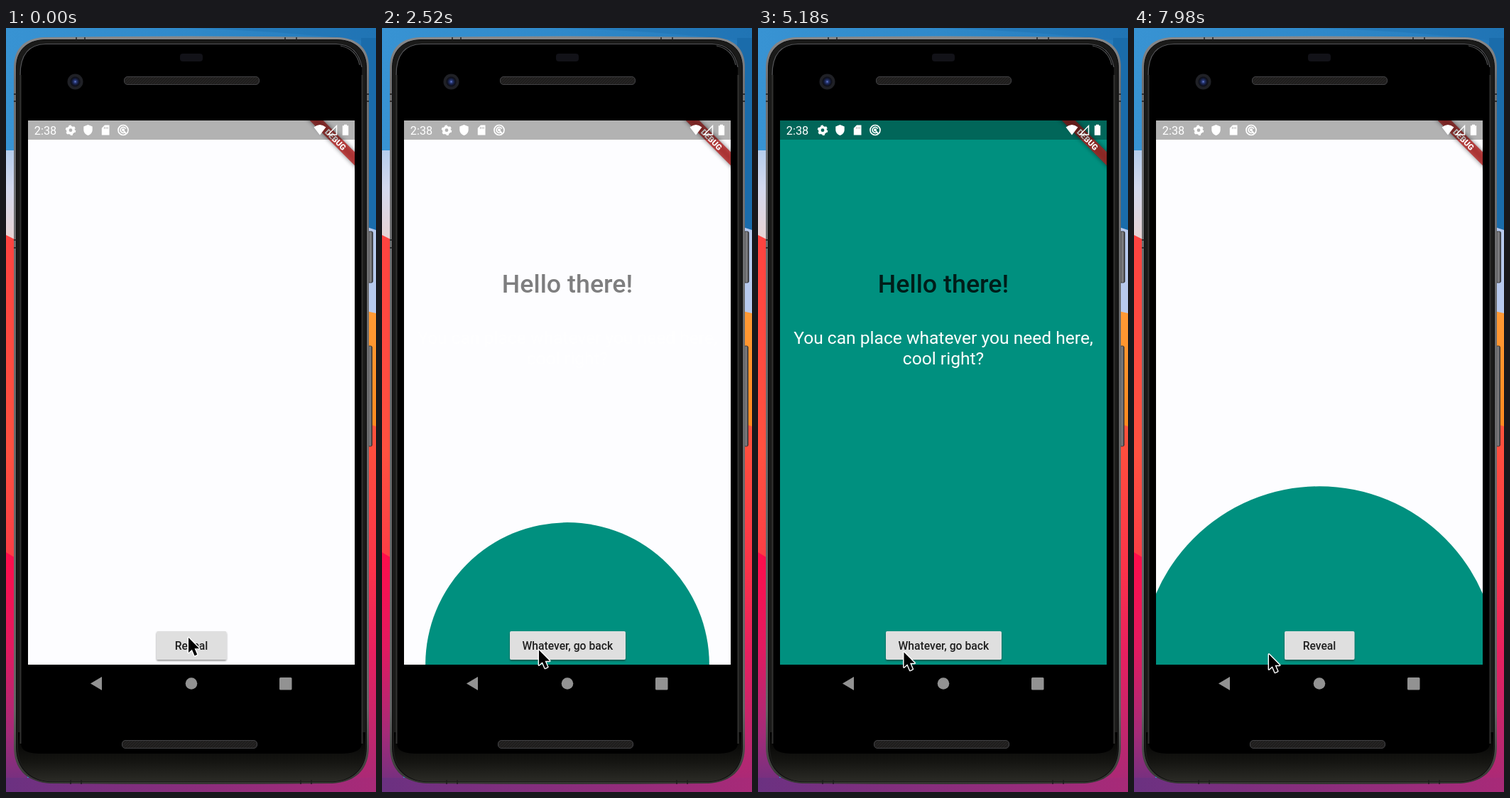
These frames come from a looping animation (521 px wide and 1074 px high, 8000 ms). An HTML page:

```html
<!DOCTYPE html>
<html lang="en">
<head>
<meta charset="utf-8">
<title>Circular reveal</title>
<style>
html, body { margin: 0; width: 100%; height: 100%; overflow: hidden; background: #000; }
svg { display: block; width: 100%; height: 100%; }
text { font-family: Roboto, "Liberation Sans", sans-serif; text-anchor: middle; }
.label { font-size: 15.7px; font-weight: 500; fill: #1f1f1f; }
</style>
</head>
<body>
<svg viewBox="0 0 521 1074" preserveAspectRatio="none">
  <defs>
    <linearGradient id="sky" x2="1" y2="0"><stop stop-color="#3893d3"/><stop offset=".5" stop-color="#2f89ca"/><stop offset="1" stop-color="#2479ba"/></linearGradient>
    <linearGradient id="haze" x2="0" y2="1"><stop stop-color="#b5cdec"/><stop offset=".4" stop-color="#d3d9ee"/><stop offset="1" stop-color="#ead3d2"/></linearGradient>
    <linearGradient id="red" x2="0" y2="1"><stop stop-color="#ff4340"/><stop offset=".65" stop-color="#ff5140"/><stop offset="1" stop-color="#fb3c46"/></linearGradient>
    <linearGradient id="redRight" x2="0" y2="1"><stop stop-color="#ff553b"/><stop offset=".4" stop-color="#fb3349"/><stop offset=".62" stop-color="#e8205f"/><stop offset="1" stop-color="#a52a78"/></linearGradient>
    <linearGradient id="orange" x2="0" y2="1"><stop stop-color="#ff9a35"/><stop offset="1" stop-color="#ff8a20"/></linearGradient>
    <linearGradient id="pink" x2="0" y2="1"><stop stop-color="#ff0d4b"/><stop offset=".4" stop-color="#e21a60"/><stop offset=".75" stop-color="#a52b78"/><stop offset="1" stop-color="#6b3181"/></linearGradient>
    <linearGradient id="floor" x2="1" y2="0"><stop stop-color="#6b3181"/><stop offset="1" stop-color="#a82a78"/></linearGradient>
    <linearGradient id="rim" x2="0" y2="1"><stop stop-color="#88898b"/><stop offset=".06" stop-color="#707173"/><stop offset=".9" stop-color="#646465"/><stop offset="1" stop-color="#343531"/></linearGradient>
    <linearGradient id="chin" x2="0" y2="1"><stop stop-color="#000"/><stop offset=".6" stop-color="#151512"/><stop offset="1" stop-color="#2b2b26"/></linearGradient>
    <linearGradient id="key" x2="1" y2="0"><stop stop-color="#3a3a3c"/><stop offset=".6" stop-color="#858588"/><stop offset="1" stop-color="#343436"/></linearGradient>
    <radialGradient id="lens"><stop stop-color="#6d83d8"/><stop offset=".16" stop-color="#2a3a7a"/><stop offset=".4" stop-color="#131a38"/><stop offset=".58" stop-color="#0f1017"/><stop offset=".7" stop-color="#202127"/><stop offset="1" stop-color="#1f2025"/></radialGradient>
    <pattern id="mesh" width="4" height="4" patternUnits="userSpaceOnUse"><rect width="4" height="4" fill="#1c1b1b"/><path d="M0 4L4 0" stroke="#32312f"/></pattern>
    <filter id="soft" x="-20%" y="-60%" width="140%" height="220%"><feGaussianBlur stdDeviation="3"/></filter>
    <filter id="lift" x="-10%" y="-20%" width="120%" height="150%"><feDropShadow dx="0" dy="1.6" stdDeviation="1.2" flood-opacity=".45"/></filter>
    <clipPath id="screen"><rect x="31" y="130" width="460" height="765"/></clipPath>
    <g id="speaker"><rect width="190" height="11" rx="4.5" fill="url(#mesh)" stroke="#424245"/></g>
  </defs>

  <!-- wallpaper -->
  <rect width="521" height="1074" fill="url(#sky)"/>
  <path d="M240 0Q380 2 521 20V0Z" fill="#1b6ba8" opacity=".35"/>
  <rect x="500" y="14" width="21" height="270" fill="#1a6cab"/>
  <rect y="172" width="30" height="130" fill="url(#haze)"/>
  <path d="M0 291L30 306V760H0Z" fill="url(#red)"/>
  <path d="M0 737L30 755V1074H0Z" fill="url(#pink)"/>
  <path d="M490 274L521 284V402H490Z" fill="#b7c9ed"/>
  <path d="M490 394L521 401V562H490Z" fill="url(#orange)"/>
  <path d="M490 550L521 560V1074H490Z" fill="url(#redRight)"/>
  <rect y="1054" width="521" height="20" fill="url(#floor)"/>

  <!-- phone -->
  <g fill="url(#key)" stroke="#2a2a2c" stroke-width=".8">
    <rect x="509" y="286" width="7.5" height="72" rx="2"/>
    <rect x="509" y="447" width="6.5" height="141" rx="2"/>
  </g>
  <path d="M54 13Q261 10 466 13C494 14 511 28 511 55V1010C511 1043 492 1060 460 1062Q261 1064 62 1062C30 1060 11 1043 11 1010V56C11 28 27 14 54 13Z" fill="url(#rim)"/>
  <path d="M55 16.5H466C492 17 507.5 31 507.5 56V1010C507.5 1041 489 1058 460 1059.500H62C33 1058 14.500 1041 14.500 1010V56C14.500 31 30 17 55 16.500Z" fill="#1a1a19" stroke="#0a0a0a"/>
  <path d="M17 990H506V1010C506 1040 488 1058 460 1059.500H62C34 1058 17 1040 17 1010Z" fill="url(#chin)"/>
  <path d="M56 22H465C488 22 501 36 501 58V1005C501 1016 490 1020 470 1020H50C30 1020 21 1016 21 1005V58C21 36 34 22 56 22Z" fill="#000"/>
  <path d="M20 66C20 36 33 23 56 22.5H465C484 23 497 32 501 55" fill="none" stroke="#555659" stroke-width="1.2"/>
  <path d="M471 25C486 28 495 38 498 52" fill="none" stroke="#a5a7aa" stroke-width="1.2" opacity=".5"/>
  <path d="M20.5 66V1006M501.5 66V1006" stroke="#323231" stroke-width="2"/>
  <path d="M11 93h7m-7 10h7M11 298h7m-7 11h7M504 93h7m-7 10h7M99 13v5m12-5v5M393 13v5m16-5v5M91 1057v6m15-6v6M415 1057v6m15-6v6" stroke="#1b1b1b" stroke-width="1.4"/>
  <circle cx="97.500" cy="75.500" r="11" fill="url(#lens)"/>
  <rect x="245" y="36" width="32" height="11" rx="4" fill="#121218"/>
  <use href="#speaker" x="166.500" y="68.500"/>
  <use href="#speaker" x="163.500" y="1001.500"/>
  <g fill="#929292">
    <path d="M119 921.500L135 912V931Z"/>
    <circle cx="261" cy="921.500" r="8.300"/>
    <rect x="385" y="913" width="17.500" height="17.500" rx="1.500"/>
  </g>

  <!-- app -->
  <g clip-path="url(#screen)">
    <rect x="31" y="130" width="460" height="765" fill="#fdfdff"/>
    <circle id="disc" cx="261" cy="895" fill="#00907f"/>
    <g id="message">
      <text x="261" y="372" font-size="35.8" font-weight="500" fill-opacity=".8">Hello there!</text>
      <text font-size="24.6" fill="#fff"><tspan x="261" y="443.600">You can place whatever you need here,</tspan><tspan x="261" y="472.600">cool right?</tspan></text>
    </g>
    <g id="reveal">
      <rect x="212" y="848" width="98.500" height="40" rx="2" fill="#dfdfdf" filter="url(#lift)"/>
      <text class="label" x="261" y="874">Reveal</text>
    </g>
    <g id="back">
      <rect x="180" y="848" width="163" height="40" rx="2" fill="#dfdfdf" filter="url(#lift)"/>
      <text class="label" x="261.300" y="874">Whatever, go back</text>
    </g>
    <g transform="translate(491 130) rotate(45)">
      <rect x="-62" y="31.300" width="124" height="13.400" opacity=".5" filter="url(#soft)"/>
      <rect x="-62" y="31.300" width="124" height="13.400" fill="#b71c1c" opacity=".76"/>
      <text y="42.200" font-size="11.4" font-weight="900" fill="#fff">DEBUG</text>
    </g>
    <rect x="31" y="130" width="460" height="27" fill="#060600" opacity=".3"/>
  </g>

  <!-- status icons -->
  <g fill="#fff">
    <text x="55.500" y="149.800" font-size="16.3">2:38</text>
    <g fill="none" stroke="#fff">
      <circle cx="91" cy="143.700" r="4.200" stroke-width="3.600"/>
      <circle cx="91" cy="143.700" r="6.300" stroke-width="2" stroke-dasharray="3.3 3.3"/>
    </g>
    <path d="M115.500 136l6.200 2.600v4.400c0 4-2.800 7-6.200 8-3.400-1-6.200-4-6.200-8v-4.400z"/>
    <path d="M139 136.500h6.500v14h-10.700v-9.800z"/>
    <path d="M138.500 139v3m2.300-3v3m2.300-3v3" stroke="#888" stroke-width=".6"/>
    <g fill="none" stroke="#fff" stroke-width="1.700">
      <circle cx="165" cy="143.500" r="7"/>
      <path d="M169.500 149l-4.500-5.500M168.300 145.800a4 4 0 1 1 .4-4.200"/>
      <circle cx="165" cy="143.300" r="1.200"/>
    </g>
    <path d="M433.500 139.500Q442 132.500 450.500 139.500L442 150.500Z"/>
    <path d="M465.500 137.500V150H453.500Z" fill="none" stroke="#fff" stroke-width="1.500"/>
    <path d="M476 135.800h4v1.500h2.200v13.400h-8.400v-13.400h2.200z"/>
  </g>

  <!-- pointer -->
  <g id="ring" fill="none">
    <circle cx="221" cy="875.500" r="32.300" stroke="#fff" stroke-width="4" opacity=".8"/>
    <circle cx="221" cy="875.500" r="32" stroke="#000" stroke-width="2.200"/>
  </g>
  <path id="cursor" d="M0 0V19.500L4.500 15.400L8 23.500L11.300 22L7.900 14.100H14Z" stroke="#fff" stroke-width="2.600" stroke-linejoin="round" paint-order="stroke"/>
</svg>
<script>
const LOOP = 8000, MAX_RADIUS = Math.hypot(230, 765), REVEAL_STEPS = 11.47;
const OPEN = 52.13, CLOSE = 164.13;
const part = id => document.getElementById(id);
const [disc, message, reveal, back, ring, cursor] =
  ["disc", "message", "reveal", "back", "ring", "cursor"].map(part);

const progress = (n, start, length) => Math.min(1, Math.max(0, (n - start) / length));
const smooth = x => x * x * (3 - 2 * x);
const show = (el, on) => el.setAttribute("visibility", on ? "visible" : "hidden");

function stepAt(ms) {
  const t = ms + 20, rest = t % 140;
  return 3 * Math.floor(t / 140) + (rest < 20 ? 0 : rest < 40 ? 1 : 2);
}

function draw(ms) {
  const n = stepAt(ms);
  const open = n >= OPEN && n < CLOSE;
  const size = progress(n, OPEN, REVEAL_STEPS) - progress(n, CLOSE, REVEAL_STEPS);
  disc.setAttribute("r", MAX_RADIUS * size);
  message.setAttribute("opacity", open ? progress(n, OPEN, 4.6) : 0);
  show(back, open);
  show(reveal, !open);
  show(ring, n >= 24 && n <= 28);

  const first = smooth(progress(n, 8, 13)), second = smooth(progress(n, 102, 20));
  const x = 257 - 36 * first - 31 * second;
  const y = 857 + 17.5 * first + 6 * second;
  cursor.setAttribute("transform", `translate(${x} ${y}) scale(1.08)`);
}

const begin = performance.now();
function tick() {
  draw((performance.now() - begin) % LOOP);
  requestAnimationFrame(tick);
}
tick();
</script>
</body>
</html>
```
